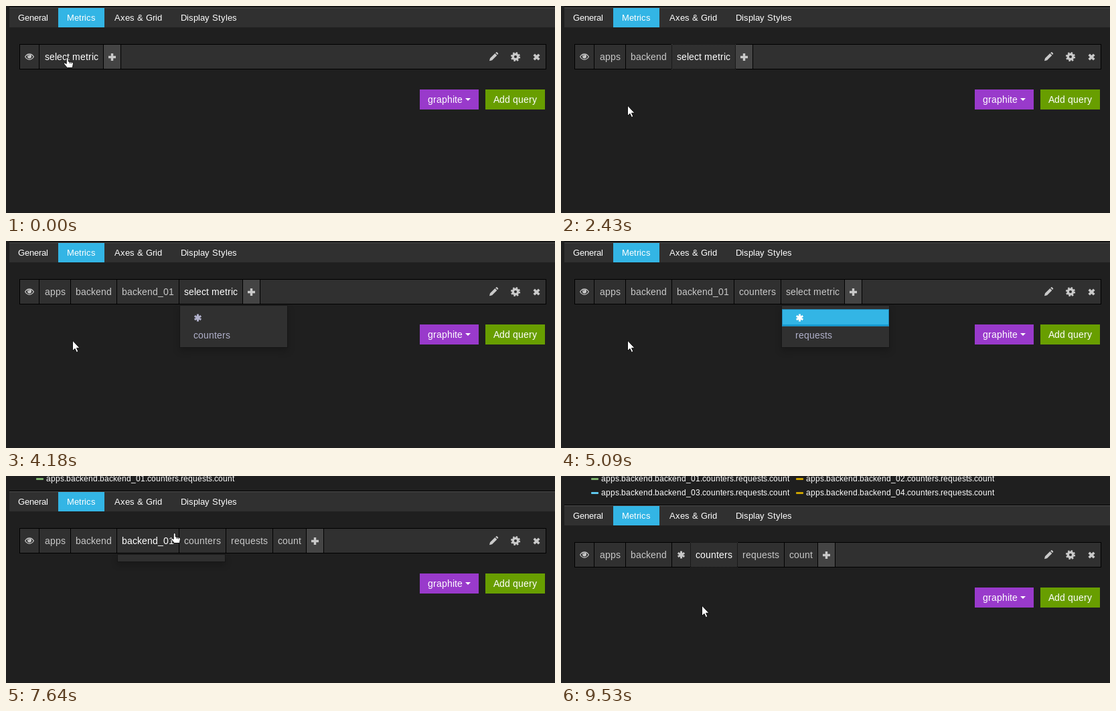
These frames come from a looping animation (820 by 310 pixels, 9.61 s). An HTML page:

```html
<!DOCTYPE html>
<html lang="en">
<head>
<meta charset="utf-8">
<title>Query editor</title>
<style>
  html, body { margin: 0; width: 820px; height: 310px; overflow: hidden; background: #1f1f1f; }
  body { position: relative; color: #fff; cursor: default; font-family: "Liberation Sans", Arial, sans-serif; }
  div, svg { position: absolute; }
  svg { overflow: visible; }
  text { fill: currentColor; }
  #page, #legend, #icons, #query { left: 0; top: 0; width: 820px; height: 310px; }
  #nav { left: 5px; top: 1px; width: 815px; height: 30px; background: #303030; border-top: 1px solid #000; box-shadow: inset 0 1px #505050; }
  #tab { left: 78px; top: 3px; width: 69px; height: 29px; background: #33b5e5; }
  #row { left: 20px; top: 57px; width: 785px; height: 36px; border: 1px solid #000; background: #303030; }
  .icon { color: #cacaca; }
  .cell { top: 58px; height: 36px; padding: 0 7px; border-right: 1px solid #000; color: #c8c8c8; }
  .lit { color: #fff; }
  .ring { left: -1px; top: -1px; right: -1px; bottom: -1px; border: 1px dotted #333; }
  .plus { width: 11px; background: #444; }
  .menu { top: 96px; width: 160px; padding: 5px 0; background: #303030; border: 1px solid rgba(0,0,0,.2); background-clip: padding-box; box-shadow: 0 5px 10px rgba(0,0,0,.2); }
  .item { position: relative; height: 26px; color: #b0b0ca; }
  .hot { color: #fff; background: #33b5e5; box-shadow: inset 0 0 0 1px #2388b4, inset 0 -3px #139bd3; }
  .button { top: 125px; height: 30px; }
</style>
</head>
<body>
<div id="legend"></div>
<div id="page">
  <div id="nav"></div>
  <div id="tab"></div>
  <div id="row"></div>
  <div class="button" style="left:618px;width:88px;background:#993acb"></div>
  <div class="button" style="left:716px;width:89px;background:#689e00"></div>
  <div id="icons"></div>
  <div id="query"></div>
</div>
<svg id="pointer" width="20" height="20" fill="#fff" stroke="#111" stroke-linejoin="round">
  <path id="arrow" d="M.5 0V15.5L4 12.3 6.4 17.6 8.9 16.5 6.5 11.3H11Z"/>
  <g id="hand" transform="translate(-5)">
    <path d="M4.2 2Q4.2.5 5.6.5T7.2 2V6L12.6 7.2Q14.6 7.7 14.4 9.6L13.4 15.5H5.4L.8 10Q0 8.3 1.6 7.9L4.2 9.5Z"/>
    <path d="M9.2 7V9M11.4 7.5V9.4" fill="none"/>
  </g>
</svg>
<script>
const LOOP = 9610, STEP = 40, LINE = 21;
const STAR = '✱', PICK = 'select metric';
const $ = id => document.getElementById(id);

// Glyphs advance by whole pixels, as hinted screen text does.
const pen = document.createElement('canvas').getContext('2d');
function advances(word, size) {
  pen.font = `${size}px "Liberation Sans", Arial, sans-serif`;
  return [...word].map(ch => Math.round(pen.measureText(ch).width));
}
const widthOf = word => word === STAR ? 13 : advances(word, 14).reduce((a, b) => a + b, 0);

function text(word, x, base, size = 14) {
  let at = 0;
  const xs = advances(word, size).map(w => (at += w) - w);
  return `<svg style="left:${x}px;top:${base}px" width="1" height="1">` +
    `<text x="${xs.join(' ')}" font-size="${size}">${word.replace('&', '&amp;')}</text></svg>`;
}

const shapes = {
  eye: '<path d="M.6 5C4-.6 10-.6 13.4 5 10 10.6 4 10.6.6 5Z" fill="none" stroke="currentColor" stroke-width="1.2"/><circle cx="7" cy="4.4" r="3" fill="currentColor"/><path d="M5.4 4.2Q5.5 2.8 7 2.7" fill="none" stroke="#303030" stroke-width=".8"/>',
  pencil: '<path d="M0 13.2 1 9.3 8.3 2 11.3 5 4 12.3ZM9.2 1.2 10.2.3Q10.9-.2 11.5.3L13.1 1.9Q13.5 2.5 13 3.1L12.1 4.1Z" fill="currentColor"/>',
  gear: '<g fill="none" stroke="currentColor"><circle cx="7" cy="7" r="3.8" stroke-width="3.4"/><circle cx="7" cy="7" r="5.8" stroke-width="2.6" stroke-dasharray="2.278"/></g>',
  cross: '<path d="M1.7 1.7 9.3 9.3M9.3 1.7 1.7 9.3" stroke="currentColor" stroke-width="3.6"/>',
  plus: '<path d="M5.5 0V11M0 5.5H11" stroke="currentColor" stroke-width="3.4"/>',
  caret: '<path d="M0 0H8L4 4Z" fill="#fff"/>',
  star: '<path d="M6.5.5V11.5M1.7 3.2 11.3 8.8M1.7 8.8 11.3 3.2" stroke="currentColor" stroke-width="3"/>'
};
const icon = (name, x, y, style = 'icon') =>
  `<svg class="${style}" style="left:${x}px;top:${y}px" width="14" height="14">${shapes[name]}</svg>`;
const label = (word, x, base) => word === STAR ? icon('star', x, base - 11, '') : text(word, x, base);

$('icons').innerHTML =
  [['General', 18], ['Metrics', 91], ['Axes & Grid', 162], ['Display Styles', 261]]
    .map(([name, x]) => text(name, x, 22, 13)).join('') +
  icon('eye', 28, 71) + icon('pencil', 722, 69) + icon('gear', 754, 69) + icon('cross', 787, 71) +
  '<div style="left:49px;top:58px;width:1px;height:36px;background:#000"></div>' +
  text('graphite', 630, 145) + icon('caret', 686, 138) + text('Add query', 728, 145);

const roots = [STAR, 'apps', 'carbon', 'collectd', 'servers', 'stats', 'statsd', 'test', 'web'];
const hosts = [STAR, ...[1, 2, 3, 4].map(n => 'backend_0' + n)];
const path = ['apps', 'backend', 'backend_01', 'counters', 'requests', 'count'];
const upTo = n => [...path.slice(0, n), PICK];

// Each step changes some fields; key: null means the mouse picks the item.
const steps = [
  [0, { cells: [PICK], open: -1, focus: -1, key: null, items: [], rows: 0, idle: false }],
  [40, { open: 0, focus: 0 }], [90, { items: roots }],
  [890, { open: -1, focus: -1 }], [930, { cells: upTo(1) }], [970, { focus: 1 }],
  [1630, { open: 1, key: -1, items: [STAR, 'backend', 'frontend'] }], [1760, { key: 0 }], [2120, { key: 1 }],
  [2430, { cells: upTo(2), open: -1, focus: 2 }],
  [2960, { open: 2, key: -1, items: hosts }], [3050, { key: 0 }], [3230, { key: 1 }], [3450, { key: 0 }], [3720, { key: 1 }],
  [3890, { open: -1, focus: -1 }], [3930, { cells: upTo(3) }], [3970, { focus: 3 }],
  [4180, { open: 3, key: -1, items: [STAR, 'counters'] }], [4350, { key: 0 }], [4480, { key: 1 }],
  [4700, { cells: upTo(4), open: -1, focus: -1 }], [4740, { focus: 4 }],
  [4960, { open: 4, key: -1, items: [STAR, 'requests'] }], [5090, { key: 0 }], [5220, { key: 1 }],
  [5480, { cells: upTo(5), open: -1, focus: -1 }], [5520, { focus: 5 }],
  [5790, { open: 5, key: -1, items: [STAR, 'count'] }], [5900, { key: 0 }], [6000, { key: 1 }],
  [6400, { cells: path, open: -1, focus: -1 }], [6440, { rows: 1 }],
  [7640, { open: 2, focus: 2, key: null, items: [] }], [7720, { items: hosts }],
  [8290, { open: -1, focus: -1 }],
  [8350, { cells: path.map((word, i) => i === 2 ? STAR : word) }], [8410, { focus: 3 }],
  [8530, { rows: 2, idle: true }], [8930, { idle: false }]
];

const moves = [
  [90, 850, [91, 77], [99, 149]],
  [7010, 7460, [99, 149], [251, 85]],
  [7640, 8080, [251, 85], [219, 130]],
  [9290, 9530, [219, 130], [210, 194]]
];

function pointerAt(t) {
  let spot = moves[0][2];
  for (const [start, end, from, to] of moves) {
    if (t < start) break;
    const u = t >= end ? 1 : Math.floor((t - start) / STEP) * STEP / (end - start);
    const ease = u * u * (3 - 2 * u);
    spot = from.map((v, i) => Math.round(v + (to[i] - v) * ease));
  }
  return spot;
}

function stateAt(t) {
  const state = {};
  for (const [time, change] of steps) if (t >= time) Object.assign(state, change);
  return state;
}

function legend(rows) {
  const colors = ['#7eb26d', '#cca300', '#5fc8ee', '#cca300'];
  return colors.slice(0, [0, 1, 4][rows]).map((color, i) => {
    const x = 45 + i % 2 * 306, y = 3 + (i >> 1) * LINE;
    return `<div style="left:${x}px;top:${y}px;width:11px;height:3px;border-radius:1px;background:${color}"></div>` +
      text(`apps.backend.backend_0${i + 1}.counters.requests.count`, x + 15, y + 5, 12);
  }).join('');
}

let last = '';
function draw(t) {
  const s = stateAt(t), [x, y] = pointerAt(t), py = y - s.rows * LINE;
  let left = 51, hover = -1, hot = -1, menuX = 0;
  const cells = s.cells.map((word, i) => {
    const cell = { word, left, width: widthOf(word) };
    if (py >= 57 && py < 95 && x >= left && x < left + cell.width + 15) hover = i;
    if (i === s.open) menuX = left;
    left += cell.width + 15;
    return cell;
  });
  if (s.open >= 0) {
    const row = Math.floor((py - 102) / 26);
    const inside = x > menuX && x <= menuX + 160 && row >= 0 && row < s.items.length;
    hot = s.key !== null ? s.key : inside ? row : -1;
  }

  let html = cells.map((c, i) => {
    const keyed = i === s.open && s.key !== null && s.key >= 0;
    const lit = !keyed && (i === hover || i === s.focus || i === s.open);
    const ring = i === s.focus && i !== hover && i !== s.open;
    return `<div class="cell ${lit ? 'lit' : ''}" style="left:${c.left}px;width:${c.width}px">` +
      `${label(c.word, 7, 23)}${ring ? '<div class="ring"></div>' : ''}</div>`;
  }).join('');
  html += `<div class="cell plus" style="left:${left}px"></div>` + icon('plus', left + 7, 71);
  if (s.open >= 0) {
    html += `<div class="menu" style="left:${menuX}px">` + s.items.map((word, i) =>
      `<div class="item ${i === hot ? 'hot' : ''}">${label(word, 20, 18)}</div>`).join('') + '</div>';
  }

  if (html + s.rows !== last) {
    last = html + s.rows;
    $('query').innerHTML = html;
    $('legend').innerHTML = legend(s.rows);
    $('page').style.top = s.rows * LINE + 'px';
  }
  const hand = !s.idle && (hover >= 0 || (s.key === null && hot >= 0));
  $('hand').style.display = hand ? '' : 'none';
  $('arrow').style.display = hand ? 'none' : '';
  $('pointer').style.left = x + 'px';
  $('pointer').style.top = y + 'px';
}

const began = performance.now();
function tick() {
  draw((performance.now() - began) % LOOP);
  requestAnimationFrame(tick);
}
tick();
</script>
</body>
</html>
```
